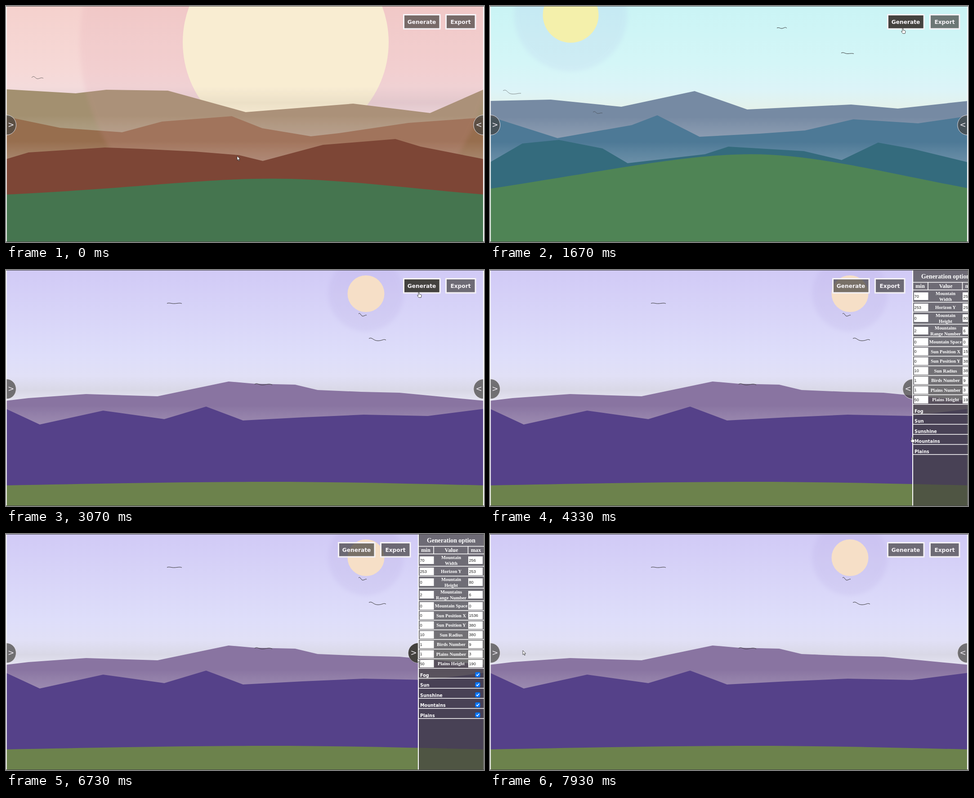
These frames come from a looping animation (1063 by 527 pixels, 8000 ms). An HTML page without scripts:

```html
<!DOCTYPE html>
<html lang="en">
<head>
<meta charset="utf-8">
<title>Landscape generator</title>
<style>
  html, body { margin: 0; width: 100%; height: 100%; overflow: hidden; background: #fff; }
  svg { display: block; width: 1063px; height: 527px; }
  .birds { fill: none; stroke: #333; stroke-width: 1; }
  .halo { opacity: .15; filter: blur(5px); }
  .glass { fill: #44423f; fill-opacity: .7; }
  .hover { fill: #44423f; }
  .button { stroke: #f5f2f6; stroke-width: 3; }
  .toggle { stroke: #e4e0e6; stroke-width: 1; }
  .caption { font: bold 12.2px "DejaVu Sans", sans-serif; fill: #f7f4f8; text-anchor: middle; }
  .arrow { font: 17px "DejaVu Sans", sans-serif; fill: #eeeaf0; text-anchor: middle; }
  .table { font: 9.2px "Liberation Sans", Arial, sans-serif; fill: #222; }
  .name { font: bold 10.4px "Liberation Serif", serif; fill: #fff; text-anchor: middle; }
  .head { font-size: 12.4px; }
  .title { font-size: 13.84px; }
  .options { font: bold 9.6px "DejaVu Sans", sans-serif; fill: #fff; }
  .rules { fill: none; stroke: #fff; stroke-width: 1.6; }
</style>
</head>
<body>
<svg viewBox="0 0 1063 527" xmlns="http://www.w3.org/2000/svg">
<defs>
  <linearGradient id="pinkSky" x2="0" y2="1">
    <stop stop-color="#f5d1cd"/><stop offset=".6" stop-color="#f6d9d7"/><stop offset="1" stop-color="#f0dfe3"/>
  </linearGradient>
  <linearGradient id="cyanSky" x2="0" y2="1">
    <stop stop-color="#caf4f5"/><stop offset=".55" stop-color="#d4f6f7"/><stop offset=".8" stop-color="#dcf4f8"/><stop offset="1" stop-color="#e4f1ea"/>
  </linearGradient>
  <linearGradient id="lilacSky" x2="0" y2="1">
    <stop stop-color="#d1caf6"/><stop offset=".65" stop-color="#dedefa"/><stop offset=".8" stop-color="#e1e0f6"/>
    <stop offset=".91" stop-color="#d9d8e6"/><stop offset="1" stop-color="#e7e6f3"/>
  </linearGradient>
  <linearGradient id="fog" x2="0" y2="1">
    <stop offset=".55" stop-color="#fff" stop-opacity="0"/><stop offset="1" stop-color="#e6e6ee" stop-opacity=".2"/>
  </linearGradient>
  <linearGradient id="haze" x2="0" y2="1">
    <stop stop-opacity="0"/><stop offset=".6" stop-opacity=".06"/><stop offset="1" stop-opacity=".02"/>
  </linearGradient>

  <path id="duskFar" d="M0,186 155,195 223,187 360,189 533,237 772,218 943,239 1063,186V292H0z"/>
  <path id="duskMid" d="M0,247 120,272 258,282 347,258 502,246 570,273 678,291 740,284 895,261 1063,249V347H0z"/>
  <path id="duskNear" d="M0,342 50,327 220,316 300,319 420,325 518,333 571,346 705,310 866,297 922,314 1063,342V527H0z"/>
  <path id="dayFar" d="M0,212 135,209 292,225 455,190 572,231 803,220 907,229 1063,212V296H0z"/>
  <path id="dayMid" d="M0,247 150,295 315,266 372,244 466,292 600,285 700,278 808,253 952,262 1063,246V352H0z"/>
  <path id="dayNear" d="M0,349 72,307 153,299 250,318 306,351 478,331 530,314 698,324 782,344 863,305 940,319 1063,349V527H0z"/>
  <path id="eveFar" d="M0,292 50,286 178,277 337,282 495,249 553,254 643,256 693,268 790,272 875,274 1063,292V347H0z"/>
  <path id="eveNear" d="M0,310 75,345 216,314 352,333 445,305 527,336 660,329 795,323 938,326 1063,310V527H0z"/>
  <path id="lowPlain" d="M0,481C250,476 430,473 585,473S900,477 1063,481V527H0z"/>

  <path id="inputs" fill="#fff" d="M920,-8.5h31.5v17h-31.5zM1028,-8.5h32v17h-32z"/>
  <g id="check">
    <rect x="1043.5" y="-5.5" width="11" height="11" rx="2" fill="#0075ff"/>
    <path d="M1046,0l2.2,2.4 4,-5" fill="none" stroke="#fff" stroke-width="1.6"/>
  </g>
  <path id="half" d="M917,243.5a22,22 0 0 0 0,44.5"/>
</defs>

<!-- Scenes, last one at the bottom -->
<g>
  <rect width="1063" height="296" fill="url(#lilacSky)"/>
  <circle class="halo" cx="800.5" cy="53" r="84" fill="#ae9ddc"/>
  <circle cx="800.5" cy="53" r="41" fill="#f6dfc7"/>
  <use href="#eveFar" fill="#8974a1"/><use href="#eveFar" fill="url(#fog)"/>
  <use href="#eveNear" fill="#554189"/>
  <use href="#lowPlain" fill="#6c824c"/>
  <path class="birds" d="M358,74.5c6,-2 10,1 17,.5s12,-2 16,0M784,98c4,-5 5,6 10,5s5,-3 8,-2M807,153c8,-4 9,5 20,5s12,-5 18,-1.500M553,255c7,-4 9,3 20,1.500s12,-3 19,0"/>
</g>

<g>
  <rect width="1063" height="296" fill="url(#lilacSky)"/>
  <circle class="halo" cx="420" cy="90" r="104" fill="#ae9ddc"/>
  <circle cx="420" cy="90" r="52" fill="#f5e6bb"/>
  <g transform="matrix(-1 0 0 1 1063 0)">
    <use href="#dayFar" fill="#8184a6"/><use href="#dayFar" fill="url(#fog)"/>
    <use href="#dayMid" fill="#626f9a"/><use href="#dayMid" fill="url(#fog)"/>
    <use href="#duskNear" fill="#455688"/>
    <use href="#lowPlain" y="-30" fill="#5e834f"/><rect y="490" width="1063" height="37" fill="#5e834f"/>
  </g>
  <animate attributeName="visibility" values="visible;hidden" keyTimes="0;.3832" calcMode="discrete" dur="8s" repeatCount="indefinite"/>
</g>

<g>
  <rect width="1063" height="232" fill="url(#cyanSky)"/>
  <circle class="halo" cx="179.500" cy="20" r="126" fill="#b0b8e8"/>
  <circle cx="179.500" cy="20" r="62" fill="#f4f0ab"/>
  <use href="#dayFar" fill="#768aa3"/><use href="#dayFar" fill="url(#fog)"/>
  <use href="#dayMid" fill="#4d7996"/><use href="#dayMid" fill="url(#fog)"/>
  <use href="#dayNear" fill="#346b7d"/>
  <path d="M0,408C270,366 440,331 580,331S860,368 1063,407V527H0z" fill="#4f8455"/>
  <path class="birds" d="M638,49c6,-2 7,2 12,1s6,-4 10,-.5M781,105c6,-3 8,2 15,1.500s8,-1 13,0"/>
  <path class="birds" opacity=".55" d="M29,189c9,-5 9,7 20,7.500s12,-2 20,-1.500M229,237c6,-4 6,3 11,3s5,-2 10,-1"/>
  <animate attributeName="visibility" values="visible;hidden" keyTimes="0;.2914" calcMode="discrete" dur="8s" repeatCount="indefinite"/>
</g>

<g>
  <rect width="1063" height="296" fill="url(#cyanSky)"/>
  <circle class="halo" cx="690" cy="110" r="150" fill="#b0b8e8"/>
  <circle cx="690" cy="110" r="75" fill="#f6eec0"/>
  <g transform="matrix(-1 0 0 1 1063 0)">
    <use href="#duskFar" fill="#8e9aa4"/><use href="#duskFar" fill="url(#fog)"/>
    <use href="#duskMid" fill="#6f8590"/><use href="#duskMid" fill="url(#fog)"/>
    <use href="#eveNear" fill="#4b6b74"/>
    <use href="#lowPlain" fill="#4f8455"/>
  </g>
  <animate attributeName="visibility" values="visible;hidden" keyTimes="0;.2082" calcMode="discrete" dur="8s" repeatCount="indefinite"/>
</g>

<g>
  <rect width="1063" height="242" fill="url(#pinkSky)"/>
  <circle cx="622" cy="81" r="229" fill="#fefcda"/>
  <rect y="180" width="1063" height="60" fill="url(#haze)"/>
  <use href="#duskFar" fill="#a39070"/><use href="#duskFar" fill="url(#fog)"/>
  <use href="#duskMid" fill="#976e4e"/><use href="#duskMid" fill="url(#fog)"/>
  <circle class="halo" cx="622" cy="81" r="458" fill="#de9bac"/>
  <use href="#duskNear" fill="#7d4636"/>
  <path d="M0,421C300,406 440,385.500 590,385.500S900,408 1063,421V527H0z" fill="#45754f"/>
  <path class="birds" opacity=".65" d="M57,160c6,-7 8,2.500 13,2.500s8,-4 13,-1"/>
  <animate attributeName="visibility" values="visible;hidden" keyTimes="0;.1082" calcMode="discrete" dur="8s" repeatCount="indefinite"/>
</g>

<!-- Page edges and left toggle -->
<path d="M0,0h1.700v527H0zM1061.500,0h1.500v527h-1.500z" fill="#fff"/>
<path class="glass toggle" d="M1.500,243.500a21,22.250 0 0 1 0,44.500"/>
<text class="arrow" x="11" y="271">&gt;</text>

<!-- Buttons, right toggle and panel slide together -->
<g transform="translate(145 0)">
  <animateTransform attributeName="transform" type="translate" values="145;145;0;0;145;145" keyTimes="0;.5075;.57;.885;.9475;1"
    calcMode="spline" keySplines="0 0 1 1;.25 .1 .25 1;0 0 1 1;.25 .1 .25 1;0 0 1 1" dur="8s" repeatCount="indefinite"/>

  <rect class="glass button" x="739.500" y="19.500" width="80.500" height="31.500"/>
  <rect class="hover" x="741" y="21" width="77.500" height="28.500" visibility="hidden">
    <animate attributeName="visibility" values="hidden;visible;hidden" keyTimes="0;.09;.42" calcMode="discrete" dur="8s" repeatCount="indefinite"/>
  </rect>
  <text class="caption" x="779.500" y="40">Generate</text>
  <rect class="glass button" x="833.500" y="19.500" width="65.500" height="31.500"/>
  <text class="caption" x="866" y="40">Export</text>

  <use href="#half" class="glass toggle"/>
  <use href="#half" class="hover" visibility="hidden">
    <animate attributeName="visibility" values="hidden;visible;hidden;visible;hidden" keyTimes="0;.477;.517;.833;.89" calcMode="discrete" dur="8s" repeatCount="indefinite"/>
  </use>
  <text class="arrow" x="906.500" y="271">&lt;
    <animate attributeName="visibility" values="visible;hidden;visible" keyTimes="0;.57;.9475" calcMode="discrete" dur="8s" repeatCount="indefinite"/>
  </text>
  <text class="arrow" x="906.500" y="271" visibility="hidden">&gt;
    <animate attributeName="visibility" values="hidden;visible;hidden" keyTimes="0;.57;.9475" calcMode="discrete" dur="8s" repeatCount="indefinite"/>
  </text>

  <rect class="glass" x="918" width="146" height="527"/>
  <rect x="916" width="2" height="527" fill="#fff"/>
  <rect x="918" y="369" width="146" height="20" fill="#999698" visibility="hidden">
    <animate attributeName="visibility" values="hidden;visible;hidden" keyTimes="0;.686;.708" calcMode="discrete" dur="8s" repeatCount="indefinite"/>
  </rect>
  <path class="rules" d="M918,27.500h146m-146,17h146m-146,27.500h146m-146,22h146m-146,27h146m-146,28h146m-146,22h146m-146,21.500h146m-146,21.500h146m-146,21.500h146m-146,21.500h146m-146,21.500h146m-146,21.500h146m-146,22h146m-146,22.500h146m-146,22.500h146m-146,22.500h146m-146,22.500h146M951,28v16M1027.500,28v16"/>

  <text class="name title" x="990" y="18.500">Generation option</text>
  <text class="name head" y="40"><tspan x="933.500">min</tspan><tspan x="990.500">Value</tspan><tspan x="1045">max</tspan></text>
  <g class="table">
    <g transform="translate(0 58.500)"><use href="#inputs"/><text x="920.500" y="3">70</text><text x="1029.500" y="3">256</text>
      <text class="name"><tspan x="990" y="-2.500">Mountain</tspan><tspan x="990" y="10">Width</tspan></text></g>
    <g transform="translate(0 83.500)"><use href="#inputs"/><text x="920.500" y="3">253</text><text x="1029.500" y="3">253</text>
      <text class="name" x="990" y="3.500">Horizon Y</text></g>
    <g transform="translate(0 107.500)"><use href="#inputs"/><text x="920.500" y="3">0</text><text x="1029.500" y="3">80</text>
      <text class="name"><tspan x="990" y="-2.500">Mountain</tspan><tspan x="990" y="10">Height</tspan></text></g>
    <g transform="translate(0 135.500)"><use href="#inputs"/><text x="920.500" y="3">2</text><text x="1029.500" y="3">6</text>
      <text class="name"><tspan x="990" y="-2.500">Mountains</tspan><tspan x="990" y="10">Range Number</tspan></text></g>
    <g transform="translate(0 160.500)"><use href="#inputs"/><text x="920.500" y="3">0</text><text x="1029.500" y="3">0</text>
      <text class="name" x="990" y="3.500">Mountain Space</text></g>
    <g transform="translate(0 182)"><use href="#inputs"/><text x="920.500" y="3">0</text><text x="1029.500" y="3">1536</text>
      <text class="name" x="990" y="3.500">Sun Position X</text></g>
    <g transform="translate(0 203.500)"><use href="#inputs"/><text x="920.500" y="3">0</text><text x="1029.500" y="3">380</text>
      <text class="name" x="990" y="3.500">Sun Position Y</text></g>
    <g transform="translate(0 225)"><use href="#inputs"/><text x="920.500" y="3">10</text><text x="1029.500" y="3">380</text>
      <text class="name" x="990" y="3.500">Sun Radius</text></g>
    <g transform="translate(0 246.500)"><use href="#inputs"/><text x="920.500" y="3">1</text><text x="1029.500" y="3">9</text>
      <text class="name" x="990" y="3.500">Birds Number</text></g>
    <g transform="translate(0 268)"><use href="#inputs"/><text x="920.500" y="3">1</text><text x="1029.500" y="3">3</text>
      <text class="name" x="990" y="3.500">Plains Number</text></g>
    <g transform="translate(0 289.500)"><use href="#inputs"/><text x="920.500" y="3">50</text><text x="1029.500" y="3">190</text>
      <text class="name" x="990" y="3.500">Plains Height</text></g>
  </g>
  <g class="options">
    <text x="921" y="318.500">Fog</text><use href="#check" y="314"/>
    <text x="921" y="341">Sun</text><use href="#check" y="336.500"/>
    <text x="921" y="363.500">Sunshine</text><use href="#check" y="359"/>
    <text x="921" y="386">Mountains</text><use href="#check" y="381.500"/>
    <text x="921" y="408.500">Plains</text><use href="#check" y="404"/>
  </g>
</g>

<path d="M0,.5H1063M0,526.500H1063" stroke="#444"/>

<g stroke="#222" stroke-width=".8" fill="#fff" stroke-linejoin="round" transform="translate(514 335)">
  <animateTransform attributeName="transform" type="translate" dur="8s" repeatCount="indefinite"
    values="514,335;514,335;918,50;918,50;1050,266;1050,266;938,374;985,312;985,50;995,375;995,349;995,330;990,28;1000,385;1008,272;915,277;915,277;279,250;279,250;73,260;73,260"
    keyTimes="0;.008;.0917;.416;.483;.5075;.541;.609;.65;.69;.7;.716;.7625;.8;.825;.841;.891;.95;.972;.991;1"/>
  <path d="M0,0V9.500L2.200,7.500 3.700,11 5.200,10.300 3.700,7H6.500z">
    <animate attributeName="visibility" values="visible;hidden;visible;hidden;visible;hidden;visible" keyTimes="0;.0905;.42;.479;.609;.68;.7175" calcMode="discrete" dur="8s" repeatCount="indefinite"/>
  </path>
  <path visibility="hidden" d="M-1,0Q0,-1 1,0V4L5,5Q6,5.500 6,7L5,11.500H0L-3.500,7Q-3.500,5.500 -1,7z">
    <animate attributeName="visibility" values="hidden;visible;hidden;visible;hidden;visible;hidden" keyTimes="0;.0905;.42;.479;.609;.68;.7175" calcMode="discrete" dur="8s" repeatCount="indefinite"/>
  </path>
</g>
</svg>
</body>
</html>
```
